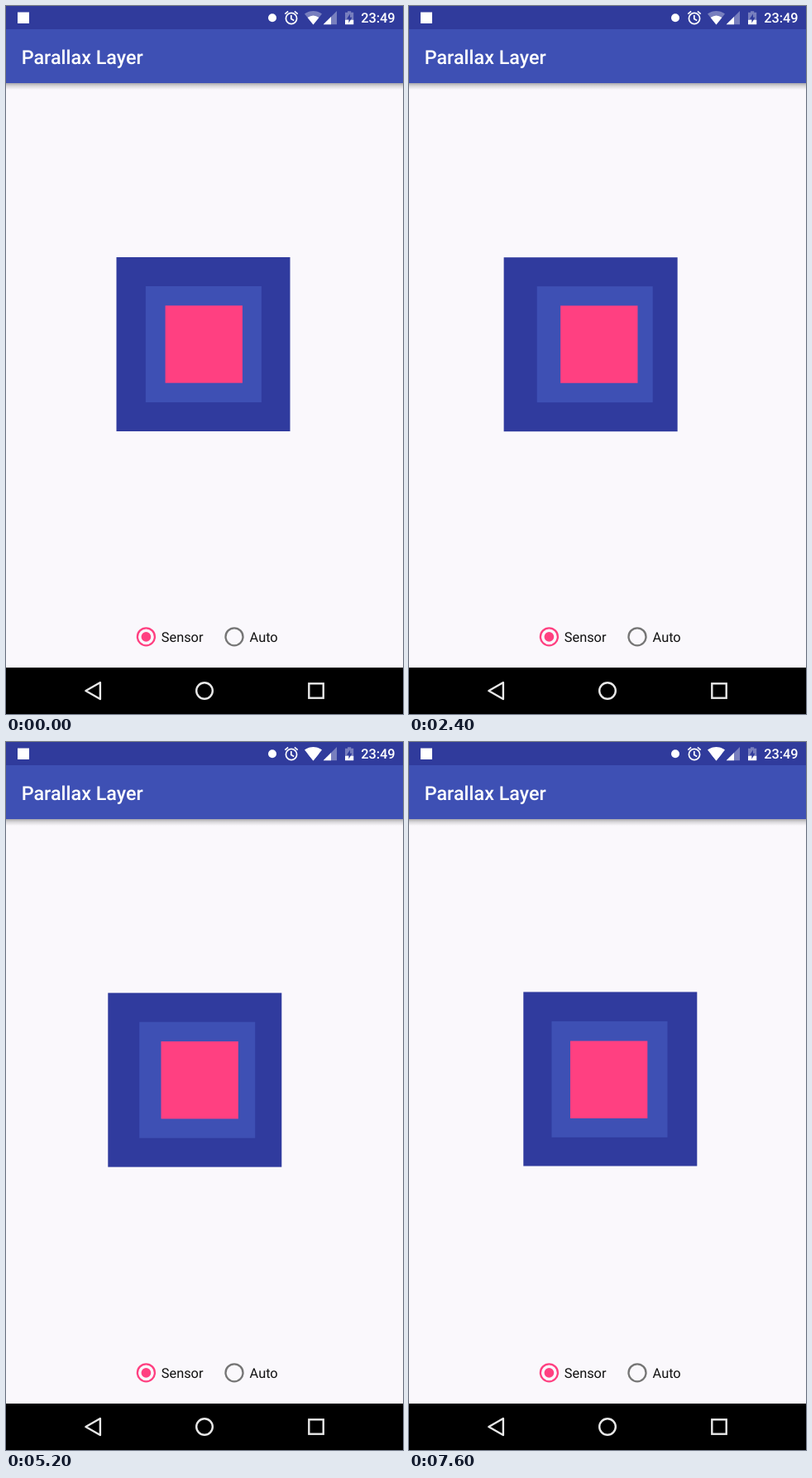
Recreate the animation shown at these times as an HTML page. Size 480 by 854 pixels, loop 7.8 s.

```html
<!DOCTYPE html>
<html lang="en">
<head>
<meta charset="utf-8">
<title>Parallax Layer</title>
<style>
  html, body { margin: 0; width: 100%; height: 100%; overflow: hidden; background: #faf8fc; }
  svg { display: block; width: 100vw; height: 100vh; }
  text { font-family: Roboto, "Open Sans", sans-serif; font-size: 16.33px; text-rendering: geometricPrecision; }
  .bold { font-weight: 500; fill: #fff; }
  .dim { fill-opacity: .35; }
</style>
</head>
<body>
<svg viewBox="0 0 480 854">
  <defs>
    <linearGradient id="shade" x2="0" y2="1">
      <stop offset="0" stop-opacity=".32"/>
      <stop offset=".45" stop-opacity=".13"/>
      <stop offset="1" stop-opacity="0"/>
    </linearGradient>
  </defs>
  <rect width="480" height="854" fill="#faf8fc"/>

  <!-- app bar -->
  <rect y="93" width="480" height="8" fill="url(#shade)"/>
  <rect width="480" height="93" fill="#3e50b4"/>
  <rect width="480" height="28" fill="#303b9c"/>
  <text class="bold" x="18.67" y="69.8" style="font-size:23.33px">Parallax Layer</text>

  <!-- status icons -->
  <g fill="#fff">
    <rect x="14" y="7.5" width="14" height="13.5"/>
    <circle cx="322" cy="14.3" r="5"/>
    <g fill="none" stroke="#fff" stroke-width="1.7">
      <circle cx="345" cy="15" r="6.6"/>
      <path d="M337.3 9.6l3.8-3.2M352.7 9.6l-3.8-3.2M344.8 11v4.4l3.4 2"/>
    </g>
    <path id="wifi" d="M361 9.6C361.4 9.3 365.4 6 371.5 6S381.6 9.3 382 9.6L371.5 22.5z"/>
    <path d="M364.6 14.1Q371.5 8.8 378.4 14.1L371.5 22.5z"/>
    <path class="dim" d="M383.7 22.3L400 6V22.3z"/>
    <path d="M383.7 22.3L393 13V22.3z"/>
    <path class="dim" d="M410 7.8h3V6.2h4.2v1.6h3v14.4H410z"/>
    <path d="M410 16.8h10.2v5.4H410z"/>
    <path fill="#303b9c" d="M416 9.4l-4.2 6.4h2.6v4.6l4-6.6h-2.4z"/>
  </g>
  <text class="bold" x="470.6" y="20.2" text-anchor="end">23:49</text>

  <!-- layers, back to front -->
  <g id="layers">
    <rect width="210" height="210" fill="#303b9e"/>
    <rect width="140" height="140" fill="#3e50b4"/>
    <rect width="93.33" height="93.33" fill="#ff4081"/>
  </g>

  <!-- radio buttons -->
  <g fill="none" stroke-width="2.33">
    <circle cx="169.4" cy="760.8" r="10.5" stroke="#ff4081"/>
    <circle cx="276" cy="760.8" r="10.5" stroke="#757575"/>
  </g>
  <circle cx="169.4" cy="760.8" r="5.83" fill="#ff4081"/>
  <text x="187.8" y="766.7" fill="#111">Sensor</text>
  <text x="294.6" y="766.7" fill="#111">Auto</text>

  <!-- navigation bar -->
  <rect y="798" width="480" height="56" fill="#000"/>
  <g fill="none" stroke="#e8e8e8" stroke-width="2.4">
    <path stroke-linejoin="round" d="M96.4 826L113.9 816V836z"/>
    <circle cx="240" cy="826" r="9.8"/>
    <rect x="366.3" y="817.3" width="17.4" height="17.4"/>
  </g>
</svg>
<script>
  const LOOP = 7800, STEP = 100, WIFI_ON = 3500;
  const CENTER = { x: 240, y: 408 };

  // Turning points of the hand's swing
  const TURNS = [
    { at: 0, x: -1.5, y: 0 },
    { at: 1450, x: 20, y: -.7 },
    { at: 2850, x: -32.7, y: .5 },
    { at: 3050, x: -32.7, y: .5 },
    { at: 4350, x: 28, y: -1.1 },
    { at: 5750, x: -31.7, y: 0 },
    { at: 6700, x: 3.3, y: -1.5 }
  ];

  const swing = u => (1 - Math.cos(Math.PI * u)) / 2;
  const mix = (a, b, k) => a + (b - a) * k;

  function tilt(t) {
    const next = TURNS.findIndex(p => p.at > t);
    if (next < 0) return TURNS[TURNS.length - 1];
    const a = TURNS[next - 1], b = TURNS[next];
    const k = swing((t - a.at) / (b.at - a.at));
    return { x: mix(a.x, b.x, k), y: mix(a.y, b.y, k) };
  }

  const layers = [...document.getElementById("layers").children];
  const wifi = document.getElementById("wifi");

  function draw(time) {
    const t = Math.floor((time % LOOP) / STEP) * STEP;
    const { x, y } = tilt(t);
    layers.forEach((el, i) => {
      const half = el.getAttribute("width") / 2;
      const depth = 1 - i / 4;   // nearer layers move less
      el.setAttribute("x", CENTER.x + x * depth - half);
      el.setAttribute("y", CENTER.y + y * depth - half);
    });
    wifi.classList.toggle("dim", t < WIFI_ON);
  }

  const start = performance.now();
  function tick() {
    draw(performance.now() - start);
    requestAnimationFrame(tick);
  }
  tick();
</script>
</body>
</html>
```
